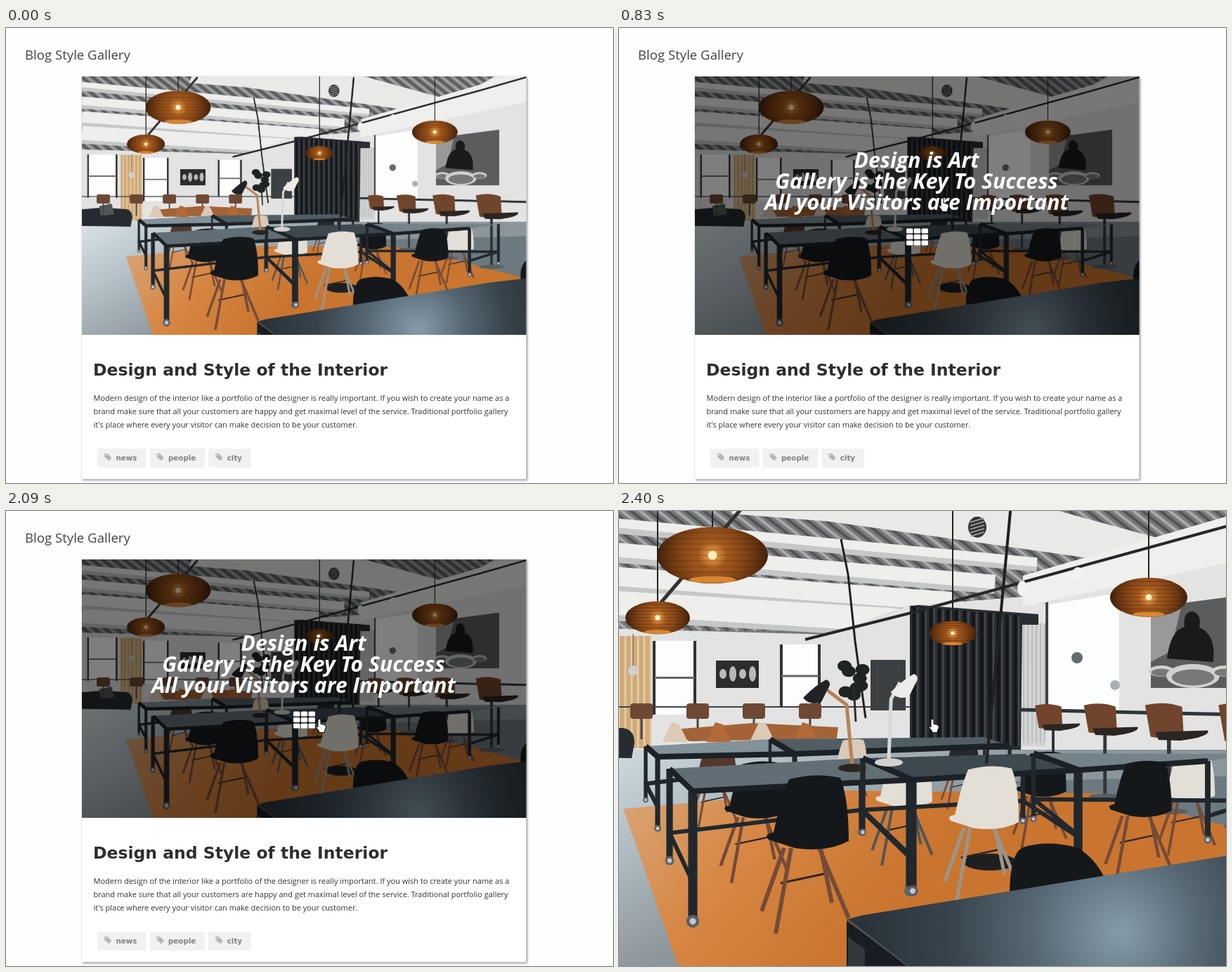
An HTML page with a canvas for the animation above (3.48 s loop, 864 by 648 pixels).

```html
<!DOCTYPE html>
<html lang="en">
<head>
<meta charset="utf-8">
<title>Blog Style Gallery</title>
<style>
html, body { margin: 0; width: 100%; height: 100%; overflow: hidden; background: #fefefe; }
canvas { display: block; }
</style>
</head>
<body>
<canvas id="stage" width="864" height="648"></canvas>
<script>
const LOOP = 3480;
const stage = document.getElementById('stage').getContext('2d');
const room = document.createElement('canvas');
room.width = 1076;
room.height = 716;
let c = room.getContext('2d');

const mix = (a, b, p) => a + (b - a) * p;
const repeat = (n, fn) => { for (let i = 0; i < n; i++) fn(i); };

// Drawing helpers, all working on the current context c
function trace(pts) {
  c.beginPath();
  for (let i = 0; i < pts.length; i += 2) c.lineTo(pts[i], pts[i + 1]);
}
function poly(fill, ...pts) { trace(pts); c.fillStyle = fill; c.fill(); }
function line(color, width, ...pts) {
  trace(pts);
  c.strokeStyle = color;
  c.lineWidth = width;
  c.stroke();
}
function rect(fill, x, y, w, h, r = 0) {
  c.beginPath();
  c.roundRect(x, y, w, h, r);
  c.fillStyle = fill;
  c.fill();
}
function oval(fill, x, y, rx, ry = rx) {
  c.beginPath();
  c.ellipse(x, y, rx, ry, 0, 0, 7);
  c.fillStyle = fill;
  c.fill();
}
function shape(fill, d, x = 0, y = 0, s = 1, outline) {
  const p = new Path2D(d);
  c.save();
  c.translate(x, y);
  c.scale(s, s);
  c.fillStyle = fill;
  c.fill(p);
  if (outline) { c.strokeStyle = outline; c.lineWidth = 1.1; c.stroke(p); }
  c.restore();
}
function blend(gradient, ...colors) {
  colors.forEach((color, i) => gradient.addColorStop(i / (colors.length - 1), color));
  return gradient;
}
function text(str, x, y, font, color) {
  c.font = font;
  c.fillStyle = color;
  c.fillText(str, x, y);
}

// Perspective: the floor point below a table top, and the size of things standing at a depth
const HORIZON = 290;
const floorBelow = y => HORIZON + (y - HORIZON) * 2.7;
const sizeAt = y => (y - HORIZON) / 312;

function pendant(x, y, rx) {
  const ry = rx * .51;
  line('#222', 2, x, -57, x, y - ry);
  const glow = c.createRadialGradient(x, y, 1, x, y, rx);
  oval(blend(glow, '#f0a850', '#a4591d', '#8b4a18', '#6b3711', '#42210d'), x, y, rx, ry);
  repeat(9, i => {
    const h = (i - 4) / 5, w = rx * Math.sqrt(1 - h * h);
    line('rgba(35,15,4,.3)', 1, x - w, y + h * ry, x + w, y + h * ry);
  });
  oval('#d98632', x, y + ry * .86, rx * .42, ry * .12);
  oval('#fff0c0', x, y, rx * .08);
}

function chair(x, feet, fill, wood) {
  const s = sizeAt(feet), top = feet - 172 * s;
  const leg = (from, to, drop) => line(wood, 6 * s, x + from * s, top + 50 * s, x + to * s, top + drop * s);
  line('#292523', 3 * s, x - 45 * s, top + 100 * s, x + 25 * s, top + 85 * s);
  leg(-40, -72, 140);
  leg(12, 28, 128);
  leg(-30, -52, 172);
  leg(10, 52, 150);
  shape(fill, 'M-33-48Q5-58 40-50Q52-20 52 40Q20 57-25 50L-62 38Q-70 30-55 28Q-45-20-33-48Z', x, top, s);
}

function stool(x, y, s) {
  line('#30363a', 5 * s, x + 6, y + 20 * s, x + 6, y + 115 * s);
  oval('#596064', x + 6, y + 115 * s, 24 * s, 4 * s);
  shape('#70452b', 'M-25-20Q0-26 22-18L24 17Q0 24-18 20Z', x, y, s);
  shape('#2b2523', 'M-12 14L55 12Q58 20 20 25L-8 24Z', x, y, s);
}

// Corners run front left, front right, back right, back left
function table(fill, ...corners) {
  const at = (i, drop) => {
    const x = corners[i * 2], y = corners[i * 2 + 1];
    return [x, mix(y, floorBelow(y), drop)];
  };
  line('#20272d', 6, ...at(1, .7), ...at(2, .7), ...at(3, .7), ...at(0, .7));
  repeat(4, i => {
    const [x, y] = at(i, 0), [, foot] = at(i, 1), w = (y - HORIZON) * .12;
    rect('#20272d', x - w / 2, y, w, foot - y);
    oval('#596169', x, foot, w * .7);
    oval('#c3c8cb', x, foot, w * .35);
  });
  poly(fill, ...corners);
  line('#1b2126', 8, ...at(3, 0), ...at(0, 0), ...at(1, 0));
}

function framedWindow(x, y, w, h) {
  rect('#fdfdfd', x, y, w, h);
  line('#303336', 4, x, y, x, y + h);
  line('#303336', 4, x + w, y, x + w, y + h);
  line('#666', 3, x, y + h / 2, x + w, y + h / 2);
}

function drawWalls() {
  rect('#e2e3e2', -100, -57, 1076, 716);
  framedWindow(-85, 177, 69, 105);
  framedWindow(50, 185, 58, 105);
  framedWindow(231, 190, 54, 90);
  rect('#cfaa78', -6, 178, 52, 160);
  repeat(6, i => line('#e5cba4', 3, i * 9, 178, i * 9, 338));
  rect('#2b2c2d', 138, 213, 61, 39);
  repeat(4, i => oval('#b9b9b7', 148 + i * 14, 232, 5, 7 + i % 2 * 4));
  line('#3f4244', 2, -100, 279, 414, 279);
  rect('#3c4042', 358, 212, 50, 72);
  repeat(9, i => oval('#1d2422', 334 + 13 * Math.sin(i * 2.4), 241 + 21 * Math.cos(i * 1.7), 10, 8));
  line('#2a2e2c', 3, 334, 250, 337, 300);

  poly('#fdfefe', 606, 134, 712, 117, 712, 284, 606, 284);
  line('#404345', 4, 609, 130, 609, 280);
  rect('#d3d5d5', 574, 160, 33, 175);
  repeat(6, i => line('#b1b4b5', 1.5, 576 + i * 6, 160, 576 + i * 6, 330));

  // Picture of a drummer
  poly('#5a5c5d', 757, 137, 910, 117, 910, 252, 757, 252);
  poly('#99999a', 757, 145, 800, 138, 785, 200, 757, 215);
  shape('#181a1b', 'M780 210Q785 170 805 165Q802 144 816 143Q830 147 826 166Q850 175 846 215Z');
  repeat(3, i => {
    const x = 772 + i * 45, y = 228 + i % 2 * 7, r = 18 + i % 2 * 20;
    oval('#d0d1d0', x, y, r, r * .45);
    oval('#777979', x, y + 2, r * .8, r * .3);
  });
  oval('#666b70', 652, 209, 8);
  oval('#aab0b4', 706, 248, 7);

  poly('#2a2d31', 414, 133, 597, 147, 597, 162, 574, 162, 572, 345, 414, 335);
  repeat(13, i => {
    const x = 420 + i * 12;
    line('#14171a', 5, x, 136 + i, x, 335);
    line('#464a4f', 2, x + 5, 137 + i, x + 5, 335);
  });
}

function drawCeiling() {
  c.save();
  trace([-100, -57, 976, -57, 864, 8, 575, 122, 412, 135, 300, 176, -100, 165]);
  c.clip();
  rect('#77797a', -100, -57, 1076, 240);
  repeat(110, i => {
    const x = -420 + i * 13;
    line(i % 2 ? '#a9abab' : '#515355', 4, x, -57, x + 290, 170);
  });
  poly('#e9e9e8', 170, -25, 560, -18, 765, 38, 750, 78, 640, 63, 300, 15, 160, 4);
  repeat(4, i => {
    const left = 8 + i * 39, right = 595 - i * 60, end = 73 + i * 28, w = 13 + i * 7;
    line('#c6c7c7', w, -100, left + 9, right, end + 7);
    line('#eeeeed', w, -100, left, right, end);
  });
  c.restore();
  poly('#efefee', 575, 92, 864, 8, 976, -35, 976, 50, 575, 136);
  line('#252729', 4, 265, 183, 412, 146, 864, 22, 976, -10);
  line('#333', 5, 60, 130, 180, -10);
  oval('#343638', 510, 23, 13, 15);
  repeat(5, i => line('#aaa', 1.5, 500, 16 + i * 5, 520, 10 + i * 5));
  oval('#f3f3f2', 574, 110, 7, 11);
  oval('#f3f3f2', 653, 90, 8, 10);
}

function drawFloor() {
  const floor = c.createLinearGradient(-100, 330, 60, 640);
  rect(blend(floor, '#dce5ea', '#b3bfc6', '#8c9599'), -100, 340, 1076, 319);
  poly('#6c7980', 560, 385, 976, 375, 976, 490, 640, 430);
  line('#303537', 5, 570, 283, 740, 287, 976, 292);
  const rug = c.createLinearGradient(0, 400, 300, 650);
  poly(blend(rug, '#d8a678', '#d78643', '#c9752f'), 6, 424, 300, 398, 690, 402, 976, 478, 976, 659, 88, 659);
}

function deskLamp(x, y, reach, head, arm, base) {
  line(arm, 5, x + reach, y - 8, x + reach * .2, y + 16, x, y + 102);
  oval(base, x, y + 106, 20, 6);
  shape(head, 'M-18 10Q0-8 15-16Q24-12 17-2L8 16Q-8 22-18 10Z', x + reach * 1.3, y - 4);
}

function drawFurniture() {
  shape('#252b31', 'M-100 310L-52 306L0 309Q22 308 22 330L18 352L-100 350Z');
  shape('#545657', 'M-58 302L-28 296L-22 322L-54 326Z');
  repeat(5, i => {
    const x = -48 + i * 80;
    line('#444', 3, x, 290, x, 325);
    rect('#6d4934', x - 16, 274, 32, 22, 4);
  });
  poly('#a46336', 78, 311, 190, 302, 312, 308, 310, 324, 100, 328);
  repeat(4, i => {
    const x = 80 + i * 62;
    poly(i % 2 ? '#b16a38' : '#dbcab5', x - 18, 329, x - 5, 301, x + 6, 304, x + 18, 329);
  });
  repeat(4, i => stool(612 + i * 65 + i * i * 8.7, 293 + i * 3, .8 + i * .16));

  const black = '#15181b', cream = '#e4dfd6', brown = '#54392b', wood = '#754b37', steel = '#9b948c';
  chair(140, 452, brown, wood);
  chair(490, 425, '#25292c', wood);
  table('#83919a', 55, 350, 250, 346, 215, 325, 38, 335);
  table('#515d64', 250, 346, 556, 334, 520, 322, 215, 325);
  chair(815, 490, cream, wood);
  chair(605, 480, black, wood);
  chair(410, 505, cream, '#555');
  chair(200, 530, black, wood);
  chair(332, 415, '#d7cab8', wood);
  table('#626e75', 105, 399, 414, 383, 345, 352, 72, 367);
  table('#3d484f', 418, 383, 652, 369, 575, 346, 347, 352);
  table('#74828a', 655, 369, 838, 356, 908, 346, 590, 345);

  deskLamp(332, 260, -40, '#202326', '#b98254', '#2b2522');
  deskLamp(384, 252, 16, '#ecece9', '#d8d8d5', '#d1d2cf');

  oval('#1d1f20', 528, 500, 38, 12);
  chair(525, 555, cream, steel);
  chair(747, 527, black, wood);
  chair(275, 602, black, wood);
  shape(black, 'M556 548Q556 487 575 479Q610 468 650 479Q675 490 692 524Z');
  shape(black, 'M962 480Q958 445 980 430V490Z');

  const shine = c.createRadialGradient(715, 600, 10, 690, 590, 340);
  poly(blend(shine, '#8298a6', '#566773', '#37434b', '#2a333a'), 324, 582, 345, 576, 889, 487, 976, 477, 976, 659, 425, 659);
  poly('#171d22', 324, 583, 425, 659, 324, 659);
  line('#46525a', 2, 326, 582, 420, 655);
  poly('#30383d', 326, 606, 350, 624, 350, 659, 326, 659);
}

function drawRoom() {
  c.translate(100, 57);
  c.lineJoin = 'round';
  drawWalls();
  drawCeiling();
  drawFloor();
  drawFurniture();
  line('#1e2022', 4, 558, -10, 545, 130, 523, 360);
  line('#1e2022', 3, 316, 40, 326, 90, 336, 185, 351, 295);
  pendant(133, 63, 79);
  pendant(55, 152, 46);
  pendant(475, 174, 34);
  pendant(754, 123, 55);
  line('#555', 1, 20, 175, 20, 220);
  oval('#cdd0d1', 20, 227, 7);
}

// Page
const HEADLINES = ['Design is Art', 'Gallery is the Key To Success', 'All your Visitors are Important'];
const BODY = [
  'Modern design of the interior like a portfolio of the designer is really important. If you wish to create your name as a',
  'brand make sure that all your customers are happy and get maximal level of the service. Traditional portfolio gallery',
  "it's place where every your visitor can make decision to be your customer."
];

function placeRoom(x, y, s) { c.drawImage(room, x - 100 * s, y - 57 * s, 1076 * s, 716 * s); }

function drawCaption(alpha) {
  c.globalAlpha = alpha;
  rect('rgba(0,0,0,.5)', 108, 69, 633, 368);
  c.textAlign = 'center';
  HEADLINES.forEach((s, i) =>
    text(s, 423.5, 199 + i * 30.2, 'italic 700 30.2px "Open Sans", sans-serif', '#fff'));
  c.textAlign = 'left';
  repeat(9, i => rect('#fff', 409 + i % 3 * 10.8, 285.5 + Math.floor(i / 3) * 8.5, 9.4, 7, 1.5));
  c.globalAlpha = 1;
}

// Draws a tag and returns where the next one starts
function drawTag(x, label) {
  c.font = 'bold 10.3px "DejaVu Sans", sans-serif';
  const w = c.measureText(label).width + 39.5;
  rect('#f0f2f2', x, 599, w, 27, 2);
  shape('#b3b7b7', 'M0 1Q0 0 1 0H5L11 6Q11.500 7 11 7.500L7.500 11Q6.500 11 6 10.500L0 5Z', x + 10, 606, .9);
  oval('#f0f2f2', x + 12.3, 608.3, 1);
  text(label, x + 26.5, 616, c.font, '#7f8383');
  return x + w + 5;
}

function drawPage(caption) {
  rect('#fefefe', 0, 0, 864, 648);
  text('Blog Style Gallery', 27, 45, '18.6px "Open Sans", sans-serif', '#444');
  c.save();
  c.shadowColor = 'rgba(0,0,0,.45)';
  c.shadowBlur = 3;
  c.shadowOffsetX = c.shadowOffsetY = 1;
  rect('#fff', 108, 69, 632.5, 573.5);
  c.restore();
  c.save();
  c.beginPath();
  c.rect(108, 69, 632.5, 368);
  c.clip();
  placeRoom(166.8, 75.9, 1 / 1.7);
  drawCaption(caption);
  c.restore();
  text('Design and Style of the Interior', 124, 495, 'bold 23.5px "DejaVu Sans", sans-serif', '#2e2e2e');
  BODY.forEach((s, i) => text(s, 124.5, 531 + i * 19, '10.97px "Open Sans", sans-serif', '#333'));
  ['news', 'people', 'city'].reduce(drawTag, 130);
}

function drawZoom(p) {
  const scale = mix(.883, 1, p);
  rect(`rgba(20,24,24,${mix(.22, .5, p)})`, 0, 0, 864, 648);
  c.globalAlpha = mix(.47, 1, p);
  placeRoom(432 * (1 - scale), 308 * (1 - scale), scale);
  c.globalAlpha = 1;
}

function drawPointer(x, y) {
  shape('#fff', 'M-2 1.500Q0-1 2 1.500V7L7.500 8.500Q9.500 9.500 9.300 12.500L7.500 17V19.500H-.5V17.500L-5 12Q-5 9.500-2 11.500Z', x, y, 1, '#111');
}

// Progress from 0 to 1 in n equal jumps
function stepped(t, start, end, n) {
  const p = Math.floor(n * (t - start) / (end - start)) / n;
  return Math.min(1, Math.max(0, p));
}

function draw() {
  const t = performance.now() % LOOP;
  const enter = stepped(t, 590, 830, 3), settle = stepped(t, 1540, 1690, 2);
  drawPage(enter);
  if (t >= 2240) drawZoom(stepped(t, 2240, 2400, 2));
  if (t >= 1920 && t < 2090) {
    oval('#000', 445.5, 296, 10);
    oval('#fff', 445.5, 296, 9);
  }
  if (t >= 1540) drawPointer(mix(451, 446, settle), mix(282, 296, settle));
  else if (t >= 590) drawPointer(mix(136, 460, enter), mix(273, 242, enter));
  requestAnimationFrame(draw);
}

drawRoom();
c = stage;
c.imageSmoothingQuality = 'high';
draw();
</script>
</body>
</html>
```
